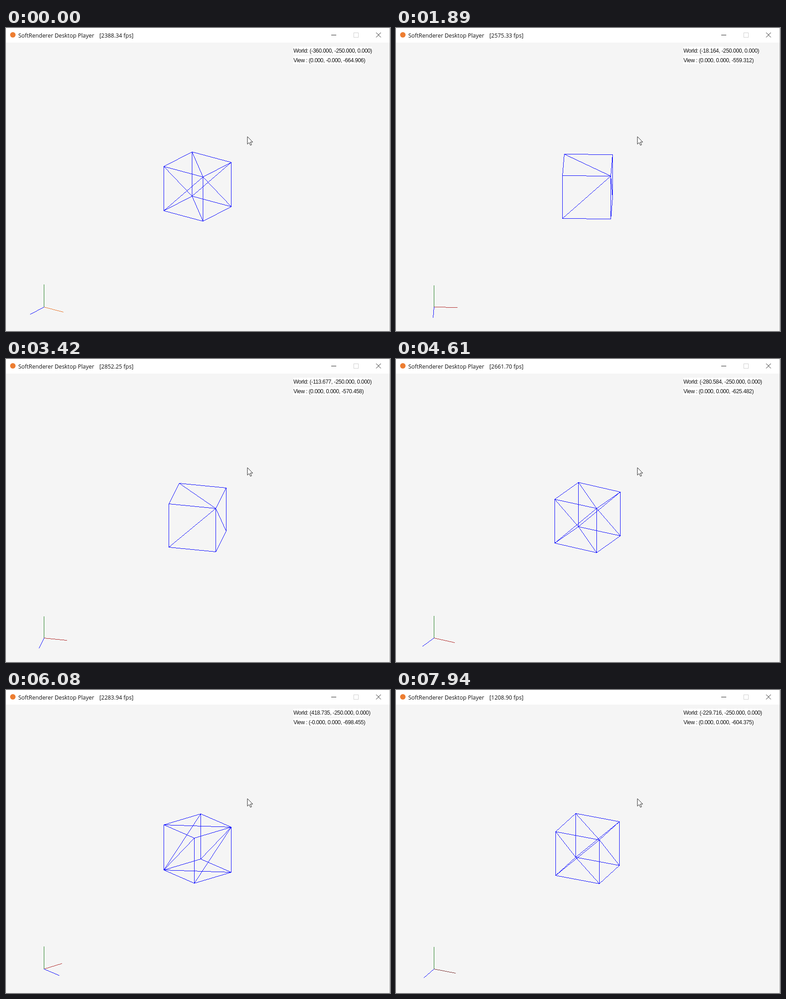
Recreate the animation shown at these times as an HTML page. Size 843 px wide and 664 px high, loop 8210 ms.

```html
<!DOCTYPE html>
<html lang="en">
<head>
<meta charset="utf-8">
<title>Wireframe cube</title>
<style>
  html, body { margin: 0; width: 100%; height: 100%; overflow: hidden; background: #fff; }
  svg { display: block; width: 843px; height: 664px; }
  text { white-space: pre; }
  .title { font: 12.4px "Open Sans", "Noto Sans", sans-serif; fill: #111; }
  .info { font: 12.2px "Liberation Sans", Arial, sans-serif; letter-spacing: -.42px; fill: #111; }
  .line { fill: none; stroke-width: 1; shape-rendering: crispEdges; }
</style>
</head>
<body>
<svg viewBox="0 0 843 664">
  <rect width="843" height="664" fill="#fff"/>
  <rect y="32" width="842" height="632" fill="#f5f5f5"/>
  <path class="line" d="M842.5 0V664" stroke="#aaa"/>

  <circle cx="15" cy="15" r="6" fill="#ed7d31"/>
  <text class="title" x="27" y="21">SoftRenderer Desktop Player</text>
  <text class="title" x="205" y="21" id="fps"></text>
  <path class="line" d="M714 15.5H725" stroke="#222"/>
  <rect class="line" x="763.5" y="10.5" width="10" height="10" stroke="#d0d0d0"/>
  <path d="M812.5 10l10.500 10.500m0-10.500l-10.500 10.500" stroke="#222" stroke-width="1"/>

  <rect x="631" y="41" height="17" fill="#fff" id="worldBack"/>
  <rect x="631" y="62" height="17" fill="#fff" id="viewBack"/>
  <text class="info" x="631" y="54" id="world"></text>
  <text class="info" x="631" y="75" id="view"></text>

  <path class="line" id="axisX"/>
  <path class="line" id="axisY" stroke="#228022"/>
  <path class="line" id="axisZ" stroke="#0a0aff"/>
  <path class="line" id="cube" stroke="#0a0aff"/>

  <path d="M530 238v16.500l3.800-3.500 2.800 6 2.600-1.200-2.800-5.800h5.300z"
        fill="#fff" stroke="#222" stroke-width="1" stroke-linejoin="round"/>
</svg>
<script>
const LOOP = 8210, MOVE_START = 1120, MOVE_END = 7540, STEP = 70;
const CULL_ON = 920, CULL_OFF = 4050;
const CAMERA_Z = 500, OBJECT_Y = -250;
const HALF = 52.66, AXIS = 51.5;
const CENTER = [420.5, 347.5], AXIS_ORIGIN = [83.5, 611.4];

// [time, world x] of the object, moving linearly between turns
const TRACK = [[1105, -360], [1890, -18.164], [2553, 293.2], [3420, -113.677], [4192, -478.5],
  [4610, -280.584], [5520, 150.265], [6106, 431.2], [6700, 153.718], [7510, -229.716]];

const FPS = [2388.34, 2471.62, 2516.08, 2493.75, 2575.33, 2630.41, 2748.19, 2852.25, 2715.86,
  2661.70, 2394.57, 1840.60, 2283.94, 2617.12, 2540.37, 2098.46, 1208.90];

// Corners as seen from above: A back left, B back right, C front left, D front right
const FLOOR = { A: [-1, -1], B: [1, -1], C: [-1, 1], D: [1, 1] };
const TOP = 1, BOTTOM = -1;
const corner = (name, y) => [FLOOR[name][0] * HALF, y * HALF, FLOOR[name][1] * HALF];
const cap = y => ['A', 'B', 'D', 'C', 'A', 'D'].map(name => corner(name, y));
// A side's diagonal runs from the top of `from` to the bottom of `to`
const side = (from, to) => [corner(from, TOP), corner(to, TOP), corner(to, BOTTOM),
  corner(from, BOTTOM), corner(from, TOP), corner(to, BOTTOM)];

const FACES = [
  { path: cap(TOP), visible: () => true },
  { path: cap(BOTTOM), visible: () => false },
  { path: side('D', 'C'), visible: () => true },
  { path: side('B', 'A'), visible: () => false },
  { path: side('D', 'B'), visible: x => x < 0 },
  { path: side('C', 'A'), visible: x => x > 0 }
];

const el = id => document.getElementById(id);
const [fps, world, view, worldBack, viewBack, axisX, axisY, axisZ, cube] =
  ['fps', 'world', 'view', 'worldBack', 'viewBack', 'axisX', 'axisY', 'axisZ', 'cube'].map(el);

function snap(t) {
  if (t < MOVE_START || t >= MOVE_END) return t;
  const start = t < 2950 ? 1120 : t < 6400 ? 1110 : 1100;
  return start + Math.floor((t - start) / STEP) * STEP;
}

function motionAt(t) {
  if (t < MOVE_START) return { x: TRACK[0][1], rising: false };
  const next = TRACK.findIndex(key => key[0] >= t);
  if (next < 0) return { x: TRACK[TRACK.length - 1][1], rising: false };
  const [t0, x0] = TRACK[next - 1], [t1, x1] = TRACK[next];
  return { x: x0 + (x1 - x0) * (t - t0) / (t1 - t0), rising: x1 > x0 };
}

// Orthographic view, in whole pixels, from a camera that always faces the object
function projector(x) {
  const flat = Math.hypot(x, CAMERA_Z), distance = Math.hypot(flat, OBJECT_Y);
  const cosYaw = CAMERA_Z / flat, sinYaw = x / flat;
  const cosPitch = flat / distance, sinPitch = -OBJECT_Y / distance;
  const project = ([px, py, pz], [ox, oy]) => [
    ox + cosYaw * px + sinYaw * pz,
    oy - cosPitch * py + sinPitch * (cosYaw * pz - sinYaw * px)
  ].map(Math.floor);
  return { project, distance };
}

// Aliased line: one pixel for each step along the longer direction
function pixelLine([x0, y0], [x1, y1]) {
  const dx = x1 - x0, dy = y1 - y0;
  const steps = Math.max(Math.abs(dx), Math.abs(dy), 1);
  let d = '';
  for (let i = 0; i <= steps; i++) {
    d += `M${Math.round(x0 + dx * i / steps)} ${Math.round(y0 + dy * i / steps) + 0.5}h1`;
  }
  return d;
}

const polyline = points => points.slice(1).map((p, i) => pixelLine(points[i], p)).join('');

function setInfo(node, back, text) {
  node.textContent = text;
  back.setAttribute('width', node.getComputedTextLength().toFixed(1));
}

function render(t) {
  const { x, rising } = motionAt(t);
  const { project, distance } = projector(x);
  const culled = t >= CULL_ON && t < CULL_OFF;

  const index = t < 130 ? 0 : Math.max(1, 1 + Math.floor((t - 139) / 520));
  fps.textContent = `[${FPS[index].toFixed(2)} fps]`;

  // Rounding in the view transform shows up as signed zeros
  const zeroX = rising && x > 0 ? '-0.000' : '0.000';
  const zeroY = t < MOVE_START || (!rising && x > 0) ? '-0.000' : '0.000';
  setInfo(world, worldBack, `World: (${x.toFixed(3)}, ${OBJECT_Y.toFixed(3)}, 0.000)`);
  setInfo(view, viewBack, `View : (${zeroX}, ${zeroY}, ${(-distance).toFixed(3)})`);

  const axis = (node, tip) => node.setAttribute('d',
    pixelLine(AXIS_ORIGIN.map(Math.floor), project(tip, AXIS_ORIGIN)));
  axis(axisX, [AXIS, 0, 0]);
  axis(axisY, [0, AXIS + 1, 0]);
  axis(axisZ, [0, 0, AXIS]);
  axisX.setAttribute('stroke', t < MOVE_START ? '#e8742a' : t < MOVE_END ? '#b02a2a' : '#7a3030');

  cube.setAttribute('d', FACES
    .filter(face => !culled || face.visible(x))
    .map(face => polyline(face.path.map(p => project(p, CENTER))))
    .join(''));
}

const begin = performance.now();
function frame() {
  render(snap((performance.now() - begin) % LOOP));
  requestAnimationFrame(frame);
}
frame();
</script>
</body>
</html>
```
